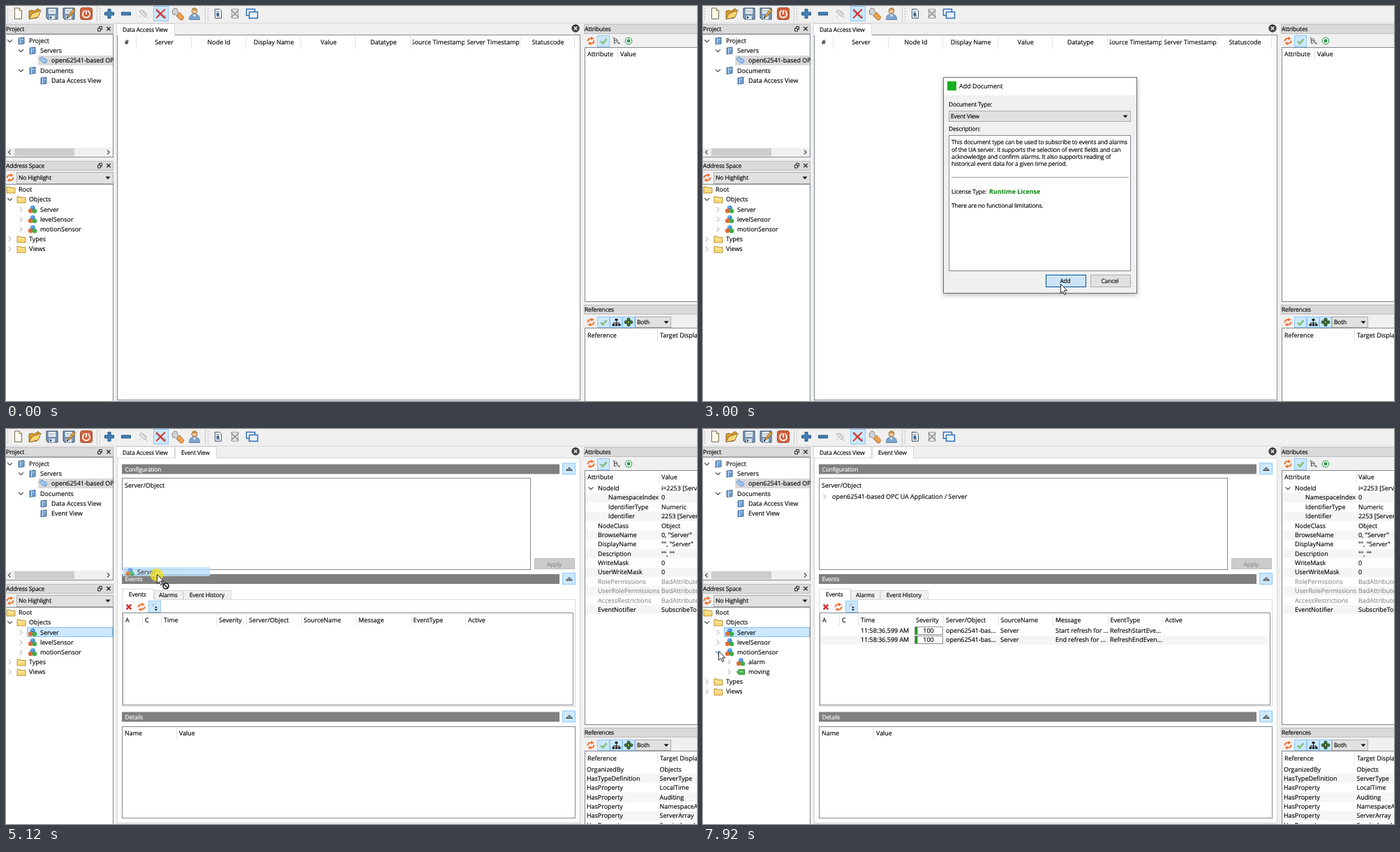
An HTML page for the animation above (8000 ms loop, 990 by 566 pixels).

```html
<!DOCTYPE html>
<html lang="en">
<head>
<meta charset="utf-8">
<title>Event view</title>
<style>
html, body { margin: 0; width: 100%; height: 100%; overflow: hidden; background: #f0f0f0; }
svg { display: block; }
text { font: 8.95px "Open Sans", "Noto Sans", sans-serif; color: #000; fill: currentColor; stroke: currentColor; stroke-width: .15px; white-space: pre; text-rendering: geometricPrecision; }
text.s { font-size: 8.5px; letter-spacing: -.19px; }
text.b { font-size: 8.85px; font-weight: 700; color: #008000; stroke: none; }
text.w { color: #fff; }
text.g { color: #8c8c8c; }
text.m { text-anchor: middle; }
</style>
</head>
<body>
<svg id="stage" width="990" height="566" viewBox="0 0 990 566"></svg>
<script>
const LOOP = 8000;
const BLUE = '#cce8ff', EDGE = '#90c8f6', LINE = '#828790', FACE = '#f0f0f0';

// Drawing helpers: y of a text is the middle of its line.
const text = (x, y, s, cls = '') => `<text x="${x}" y="${Math.round(y + 3.1)}" class="${cls}">${s}</text>`;
const small = (x, y, s, cls = '') => text(x, y, s, 's ' + cls);
const fill = (x, y, w, h, c) => `<rect x="${x}" y="${y}" width="${w}" height="${h}" fill="${c}"/>`;
const box = (x, y, w, h, c = '#fff', edge = LINE, lw = 1) =>
  `<rect x="${x + .5}" y="${y + .5}" width="${w - 1}" height="${h - 1}" fill="${c}" stroke="${edge}" stroke-width="${lw}"/>`;
const path = (d, f = 'none', s = 'none', w = 1) => `<path d="${d}" fill="${f}" stroke="${s}" stroke-width="${w}"/>`;
const circle = (x, y, r, f, s = 'none', w = 1) => `<circle cx="${x}" cy="${y}" r="${r}" fill="${f}" stroke="${s}" stroke-width="${w}"/>`;
const at = (x, y, s) => `<g transform="translate(${x} ${y})">${s}</g>`;
const group = (id, s) => `<g id="${id}">${s}</g>`;
const vline = (x, y, h, c = '#e3e3e3') => fill(x, y, 1, h, c);
const cross = (x, y, r, c, w) => path(`M${x - r} ${y - r}l${2 * r} ${2 * r}m0 ${-2 * r}l${-2 * r} ${2 * r}`, 'none', c, w);
const drop = (x, y) => path(`M${x - 3.5} ${y - 1.5}h7l-3.5 3.8z`, '#111');
const right = (x, y) => path(`M${x - 1.7} ${y - 3.4}l3.4 3.4l-3.4 3.4`, 'none', '#9a9a9a');
const down = (x, y, c = '#404040') => path(`M${x - 3.4} ${y - 1.7}l3.4 3.4l3.4 -3.4`, 'none', c, 1.2);

// Icons, each around its own middle
const icon = {
  folder: path('M-6 -4h4l1 1.5h7v7.500h-12z', '#f9d978', '#a8801f', .8) + fill(-5, -1, 10, 1, '#fff0b8'),
  book: path('M-4 -4l8 -1v9l-8 1z', '#6f9fd0', '#2d5583', .8) + path('M-1.500 -4v8.500M0 -2l3 -.3', 'none', '#c9e0f5'),
  plug: path('M-5.500 -3l3 -2.500l3 3l2 0l2.500 3l-2.500 3.500l-4 -1l-4 -4z', '#a9cdf4', '#4d83c4', .9) + path('M-3 -4l6 7', 'none', '#4d83c4', .7),
  cubes: circle(.3, -2.400, 3.400, '#3d8ee0') + circle(-2.800, 2, 3.300, '#e06a37') + circle(3, 2.300, 3.300, '#3fae49') + circle(-.6, -3.400, 1, '#a5d0fa'),
  tag: path('M-5.500 0l3 -3.500h8v7h-8z', '#49b649', '#1c7c24', .9) + fill(-1.500, -1, 5, 1, '#b9efb4'),
  refresh: path('M-4.500 .5a4 4 0 0 1 5 -4M4.500 -.5a4 4 0 0 1 -5 4', 'none', '#f26a21', 1.900) +
    path('M0 -6l4.500 2.200l-4 2.800zM0 6l-4.500 -2.200l4 -2.800z', '#f26a21'),
  check: path('M-4 .5l3 3l5.500 -6', 'none', '#5fa052', 2.400) + path('M-4 .5l3 3l5.500 -6', 'none', '#98d488', 1.200),
  page: path('M-4.500 -8h6.500l3.500 3.500v12h-10z', '#fffdee', '#655c3e', .9) + path('M2 -8v3.500h3.500', '#eadb91', '#655c3e', .7),
  open: path('M-8 7v-11l5 -1l2 1.500l6 -4l2 2v4l-4 8z', '#d99c2c', '#7a531a', .8) + path('M-8 8l4 -8l13 -5l-4 10z', '#f7d673', '#7a531a', .8),
  save: path('M-8 -8h16v16h-14l-2 -2z', '#7d9ab8', '#2f4a66') + fill(-5, -7, 10, 7, '#f3f6f9') + fill(-4, -5, 8, 1, '#a3b4c4') +
    fill(-4, -3, 8, 1, '#a3b4c4') + fill(-4, 3, 8, 5, '#dbe3ea') + fill(-3, 4, 2, 3, '#2f4a66'),
  pencil: path('M-2 4l8 -10l2.500 2l-8 9l-3 1z', '#f1a73b', '#6b4a1d', .8),
  power: `<rect x="-8.500" y="-8.500" width="17" height="17" rx="3" fill="#d4623f" stroke="#9c4a30"/>` +
    circle(0, .5, 5, 'none', '#fff', 1.800) + fill(-2, -6, 4, 6, '#d4623f') + fill(-.9, -5, 1.800, 6, '#fff'),
  plus: path('M-2 -6.500h4v4.500h4.500v4h-4.500v4.500h-4v-4.500h-4.500v-4h4.500z', '#4481b8', '#215583'),
  minus: path('M-6.500 -2h13v4h-13z', '#4481b8', '#215583'),
  link: path('M-6 -3l3 -2.500l7 7l-2.500 3z', '#e4e4e4', '#a9a9a9') + path('M-1 -5l6 6M3 4l3 2M-4 3l-2 2', 'none', '#b5b5b5'),
  cut: path('M-7 -4l3 -1l8 8l3 0v4l-3 -1z', '#b8c9dc', '#7890ab', .8) + cross(0, 0, 6.300, '#e3261c', 1.900),
  wrench: path('M-8 -4l3 -4l4 1l1 4l8 7l-1 4l-3 1l-8 -8l-3 0z', '#d1d4d7', '#72777c', .8) + path('M0 0l3 -2l6 7l-2 4l-3 0l-5 -6z', '#f0a04c', '#a8682a', .7),
  user: path('M-7.500 8.500c0 -6 3 -8 7.500 -8s7.500 2 7.500 8z', '#7fa6d3', '#4a6f98', .8) + path('M-2 1l2 4l2 -4z', '#fff') +
    circle(0, -4, 4, '#f3c79a', '#8a5c2d', .8) + path('M-4 -4a4 4.500 0 0 1 8 0q-4 -3 -8 0z', '#b98a45'),
  doc: path('M-4.500 -6.500h6.500l2.500 2.500v10.500h-9z', '#fff', '#43576b') + path('M-2.500 -2.500h4M-2.500 4h5', 'none', '#43576b') + fill(-2.500, -1, 4, 4, '#2f5f91'),
  noDoc: path('M-4.500 -6.500h9v13h-9z', '#e8e8e8', '#9a9a9a') + cross(0, 0, 5.500, '#8c8c8c', 1.500),
  windows: box(-8, -7, 13, 10, '#fff', '#2b6cb3', 1.500) + box(-4, -3, 13, 10, '#eaf4ff', '#2b6cb3', 1.500),
  tree: path('M-4 -5l1.500 1.500v6.500h3M-2.500 -1h2.500l4 5', 'none', '#4c4c4c', 1.100) + path('M-1 -4l4 4M3 3h2v2', 'none', '#4c4c4c'),
  target: circle(0, 0, 4.800, '#e9f7ec', '#2c9549', 1) + circle(0, 0, 2.400, '#2c9549'),
  chart: path('M0 -2v3M-4 3v-2h8v2M0 0v3', 'none', '#222') + fill(-2, -5, 4, 3, '#222') + fill(-6, 2.500, 3.500, 3, '#222') + fill(-1.700, 2.500, 3.500, 3, '#222') + fill(2.600, 2.500, 3.500, 3, '#222'),
  flower: [[0, -3.700], [3.700, 0], [0, 3.700], [-3.700, 0]].map(p => circle(...p, 2.100, '#3e8a3a', '#162c16')).join('') + circle(0, 0, 1.800, '#d9e25d', '#162c16'),
  scroll: path('M-3 -4h6M-3 -1.500h4', 'none', '#a9bccf') + path('M1 1.500l2 -2.500l2 2.500zM1 3l2 2.500l2 -2.500z', '#111')
};
const pic = (name, x, y) => at(x, y, icon[name]);
const active = (x, y, w, h) => box(x, y, w, h, BLUE, EDGE);

const node = (x, y, name, label, arrow) =>
  (arrow ? arrow(x - 16.500, y) : '') + pic(name, x, y) + text(x + 11, y, label);

const dockTitle = (x, y, w, label, tools) => box(x - 1, y, w + 1, 14, '#dadada', '#bcbcbc') + small(x, y + 7, label) +
  (tools ? path('M131.500 ' + (y + 6) + 'h4v4h-4zM133.500 ' + (y + 6) + 'v-2.500h4v4h-2', 'none', '#222') + cross(147, y + 6.700, 2.700, '#222', 1.300) : '');

const grip = x => [4, 8, 12, 16, 20].map(y => fill(x, y - 1, 1, 2, '#b5b5b5')).join('');

function toolbar() {
  const row = { page: 17, open: 41, save: 66, plus: 148, minus: 172, link: 197, cut: 221.500, wrench: 246, user: 270, doc: 304, noDoc: 328, windows: 352 };
  return fill(0, 0, 990, 25, FACE) + fill(0, 24, 990, 1, '#d8d8d8') + grip(2) + vline(130, 1, 22, '#c9c9c9') + grip(134) +
    vline(285, 1, 22, '#c9c9c9') + grip(289) + active(211, 0, 22, 22) + group('docHover', active(292, 0, 24, 22)) +
    Object.entries(row).map(([n, x]) => pic(n, x, 11)).join('') + pic('save', 90, 11) + pic('pencil', 91, 10) + pic('power', 115, 11);
}

function projectDock() {
  return dockTitle(0, 26, 154, 'Project', true) + box(-1, 40, 155, 177) +
    `<rect id="pick" x="46" y="71" width="107" height="14"/>` +
    down(5.500, 50) + node(22, 50, 'book', 'Project') + node(38, 64, 'book', 'Servers', down) +
    node(54, 78, 'plug', 'open62541-based OPC UA Application') +
    node(38, 92.500, 'book', 'Documents', down) + node(54, 107, 'book', 'Data Access View') +
    group('docRow', node(54, 121, 'book', 'Event View')) +
    fill(0, 203, 153, 13, FACE) + fill(12, 204, 86, 11, '#cdcdcd') +
    path('M6.500 206.500l-3 3l3 3M145 206.500l3 3l-3 3', 'none', '#505050', 1.300);
}

function addressDock() {
  return dockTitle(0, 222, 154, 'Address Space', true) + pic('refresh', 6, 246) +
    box(15, 238, 139, 17, '#e1e1e1', '#adadad') + small(18, 246, 'No Highlight') + drop(146, 246) +
    box(-1, 255, 155, 320) + pic('folder', 7, 263) + text(18, 263, 'Root') +
    node(22, 277, 'folder', 'Objects', down) +
    group('rowPick', box(30, 284, 123, 14, BLUE, '#7fbdea')) +
    node(38, 291.500, 'cubes', 'Server', right) + node(38, 305.700, 'cubes', 'levelSensor', right) +
    node(38, 320, 'cubes', 'motionSensor') + group('shut', right(21.500, 320)) +
    group('kids', down(21.500, 320, '#2c9fe0') + node(54, 334, 'cubes', 'alarm', right) + node(54, 348.300, 'tag', 'moving', right)) +
    group('tail', node(22, 334, 'folder', 'Types', right) + node(22, 348.300, 'folder', 'Views', right));
}

const attrs = [['NodeId', 'i=2253 [Server]'], ['NamespaceIndex', '0'], ['IdentifierType', 'Numeric'], ['Identifier', '2253 [Server]'],
  ['NodeClass', 'Object'], ['BrowseName', '0, "Server"'], ['DisplayName', '"", "Server"'], ['Description', '"", ""'],
  ['WriteMask', '0'], ['UserWriteMask', '0'], ['RolePermissions', 'BadAttributeIdInvalid'],
  ['UserRolePermissions', 'BadAttributeIdInvalid'], ['AccessRestrictions', 'BadAttributeIdInvalid'], ['EventNotifier', 'SubscribeToEvents']];
const refs = [['OrganizedBy', 'Objects'], ['HasTypeDefinition', 'ServerType'], ['HasProperty', 'LocalTime'], ['HasProperty', 'Auditing'],
  ['HasProperty', 'NamespaceArray'], ['HasProperty', 'ServerArray'], ['HasProperty', 'ServiceLevel']];
const PITCH = 13.37;

function rightDocks() {
  const stripe = (y, i) => i % 2 ? fill(830, y - 6.700, 160, PITCH, '#f5f5f5') : '';
  const attrRows = attrs.map(([k, v], i) => {
    const y = 85 + i * PITCH, c = i > 9 && i < 13 ? 'g' : '';
    return stripe(y, i) + text(i > 0 && i < 4 ? 863 : 848, y, k, c) + text(939, y, v, c);
  }).join('');
  const refRows = refs.map(([k, v], i) => {
    const y = 487.500 + i * PITCH;
    return stripe(y, i) + text(832, y, k) + text(936.500, y, v);
  }).join('');
  return dockTitle(829, 26, 170, 'Attributes') + pic('refresh', 838, 50) + active(847, 42, 18, 17) + pic('check', 856, 50) +
    pic('tree', 874, 50) + pic('target', 892, 50) + box(829, 59, 170, 365) + text(833, 69, 'Attribute') +
    group('attrNone', vline(876, 61, 16) + text(880, 69, 'Value')) +
    group('attrFull', vline(936, 61, 16) + text(939, 69, 'Value') + attrRows + down(838, 85)) +
    dockTitle(829, 428, 170, 'References') + pic('refresh', 838, 453) +
    [847, 865, 883].map(x => active(x, 445, 18, 16)).join('') + pic('check', 856, 453) + pic('chart', 874.500, 453) + pic('flower', 892, 453) +
    box(901, 445, 52, 16, '#e1e1e1', '#adadad') + small(904, 453, 'Both') + drop(946, 453) +
    box(829, 461, 170, 120) + text(833, 471.500, 'Reference') + vline(933, 463, 17) + text(937, 471.500, 'Target DisplayName') +
    group('refFull', refRows);
}

function dataView() {
  const heads = ['Server', 'Node Id', 'Display Name', 'Value', 'Datatype', 'Source Timestamp', 'Server Timestamp', 'Statuscode'];
  return box(159, 41, 664, 524) + text(173, 52, '#', 'm') + vline(186, 43, 18) + heads.map((h, i) => {
    const x = 187 + i * 78.570;
    return `<svg x="${x + 2.500}" y="42" width="74.500" height="20">${text(37, 10, h, 'm')}</svg>` + vline(Math.floor(x + 78), 43, 18);
  }).join('');
}

const tab = (x, y, w, h, label, c) => box(x, y, w, h + 1, c, '#d9d9d9') + small(x + w / 2 - .7, y + h / 2 + .4, label, 'm');

function section(y, label) {
  return fill(166, y, 627, 14, '#808080') + small(170.500, y + 7, label, 'w') + active(797, y - 2, 19, 17) +
    path(`M802.500 ${y + 9}l4.500 -4.500l4.500 4.500z`, '#8a949c', '#333', .9);
}

function eventView() {
  const cols = [[171, 'A', 195], [199, 'C', 222], [226, 'Time', 301], [305, 'Severity', 344], [348, 'Server/Object', 423],
    [426.500, 'SourceName', 501], [505, 'Message', 580], [583.500, 'EventType', 658], [662, 'Active', 0]];
  const row = (y, a, b) => text(226, y, '11:58:36.599 AM') + box(303, y - 6, 41, 12, '#fff', '#8f8f8f') + fill(304, y - 5, 3.500, 10, '#1d9a1d') +
    text(323, y, '100', 'm') + text(348, y, 'open62541-bas...') + text(426, y, 'Server') + text(505, y, a) + text(583, y, b);
  return box(159, 41, 664, 524, '#fff', '#d4d4d4') + section(50.500, 'Configuration') + box(166, 70, 586, 132) + text(170, 81, 'Server/Object') +
    group('confRow', right(174, 97) + text(185, 97, 'open62541-based OPC UA Application / Server')) +
    box(757, 185, 58, 16, '#cccccc', '#bfbfbf') + small(785.500, 193.500, 'Apply', 'm g') +
    section(208, 'Events') + box(166, 244, 650, 154, '#fff', '#d9d9d9') +
    tab(212, 231, 42, 13, 'Alarms', FACE) + tab(254, 231, 69, 13, 'Event History', FACE) + tab(166, 229, 46, 15, 'Events', '#fff') + fill(167, 244, 44, 2, '#fff') +
    cross(176, 255, 3.300, '#d3302f', 2.600) + pic('refresh', 194, 255) + active(204, 246, 18, 17) + pic('scroll', 212, 255) +
    box(167, 263, 646, 133) + cols.map(([x, s, v]) => text(x, 273.500, s) + (v ? vline(v, 265, 17) : '')).join('') +
    group('events', fill(168, 296, 644, 13, '#f5f5f5') + row(289, 'Start refresh for ...', 'RefreshStartEve...') + row(302, 'End refresh for ...', 'RefreshEndEven...')) +
    section(405.500, 'Details') + box(166, 426, 650, 132) + text(170, 436, 'Name') + vline(244, 428, 17) + text(248, 436, 'Value');
}

function dialog() {
  const lines = ['This document type can be used to subscribe to events and alarms', 'of the UA server. It supports the selection of event fields and can',
    'acknowledge and confirm alarms. It also supports reading of', 'historical event data for a given time period.'];
  const button = (id, x, s) => `<rect id="${id}" x="${x + .5}" y="385.500" width="57" height="17" fill="#e1e1e1" stroke="#adadad"/>` + small(x + 28, 394, s, 'm');
  return `<g style="filter:drop-shadow(0 2px 3px rgba(0,0,0,.3))">${box(344, 102, 278, 310, FACE, '#6e6e6e')}</g>` + fill(345, 103, 276, 25, '#fff') +
    fill(350, 108, 13, 13, '#18b020') + text(367, 114.500, 'Add Document') +
    group('dlgTools', text(568, 114.500, '?', 'm') + cross(603, 114.500, 4, '#333', 1)) +
    small(352, 141, 'Document Type:') + `<rect id="combo" x="352.500" y="150.500" width="260" height="15"/>` + small(355, 158, 'Event View') + drop(605, 158) +
    small(352, 176, 'Description:') + box(352, 185, 261, 195) + lines.map((s, i) => small(356, 195.300 + i * 10.250, s)).join('') +
    fill(356, 245, 254, 1, '#a0a0a0') + small(356, 266, 'License Type:') + text(410, 266, 'Runtime License', 'b') +
    small(356, 286, 'There are no functional limitations.') + button('add', 491, 'Add') + button('cancel', 555, 'Cancel');
}

const ghost = `<g opacity=".8">${fill(-49, -10, 125, 13, '#b9defa')}${pic('cubes', -38.500, -3)}${text(-28, -3, 'Server')}</g>`;
const forbid = circle(13, 17, 4, '#fff', '#111', 1.600) + path('M10 14l6 6', 'none', '#111', 1.500);
const arrow = path('M.5 .5v13l3 -2.900l2.300 5l2.200 -1l-2.300 -4.800h4.200z', '#fff', '#111', .9);

document.getElementById('stage').innerHTML = fill(0, 0, 990, 566, FACE) + projectDock() + addressDock() + fill(154, 25, 5, 541, FACE) +
  group('dataPane', dataView()) + group('eventPane', eventView()) +
  tab(158, 25, 84, 16, 'Data Access View', '#fff') + group('eventTab', tab(242, 25, 60, 16, 'Event View', '#fff') + fill(243, 41, 58, 1, '#fff')) +
  group('dataTab', fill(159, 41, 82, 1, '#fff')) + circle(816, 32, 5.700, '#3f3f3f') + cross(816, 32, 2.200, '#fff', 1.400) +
  rightDocks() + toolbar() + group('dialog', dialog()) +
  group('tip', fill(281, 181, 250, 15, 'rgba(0,0,0,.3)') + box(278, 178, 251, 16, '#fff', '#767676') + `<g opacity=".75">${text(283, 186, 'Drop event notifiers here from the Address Space window.')}</g>`) +
  group('mouse', group('ghost', ghost) + group('press', circle(0, 1, 9.300, 'rgba(240,222,40,.8)')) + arrow + group('forbid', forbid));

const el = {};
document.querySelectorAll('[id]').forEach(n => el[n.id] = n);
const show = (id, on) => el[id].setAttribute('display', on ? 'inline' : 'none');
const set = (id, o) => Object.entries(o).forEach(([k, v]) => el[id].setAttribute(k, v));
const ramp = (t, a, b) => Math.min(1, Math.max(0, (t - a) / (b - a)));

// Pointer stops: time, x, y
const stops = [[160, 870, 503], [920, 309, 13], [1000, 309, 12], [1480, 309, 12], [1960, 440, 142], [2160, 436, 160], [2800, 512, 398], [3020, 512, 398],
  [3560, 238, 322], [3700, 238, 322], [4240, 56, 291], [4440, 56, 291], [4640, 77, 294], [4920, 77, 294], [5120, 216, 208], [5400, 276, 162],
  [6720, 276, 162], [7080, 15, 332], [7520, 90, 245], [7840, 22, 318], [8000, 22, 318]];

function pointer(t) {
  const i = Math.max(1, stops.findIndex(s => s[0] >= t));
  const [a, x, y] = stops[i - 1], [b, u, v] = stops[i];
  const k = ramp(t, a, b), e = k * k * (3 - 2 * k);
  return [x + (u - x) * e, y + (v - y) * e];
}

function draw(t) {
  const [x, y] = pointer(t);
  show('mouse', t >= 160);
  set('mouse', { transform: `translate(${Math.round(x)} ${Math.round(y)})` });
  const drag = t >= 4960 && t < 5400;
  show('ghost', drag);
  show('forbid', drag && y > 202);
  show('press', t >= 4600 && t < 5400);
  show('docHover', t < 1300 && t >= 160 && x < 316 && y < 22);

  const focus = t >= 1160 && t < 1300 || t >= 3160 && t < 4200;
  set('pick', { fill: focus ? BLUE : '#d9d9d9' });

  // Dialog grows in and shrinks out
  const open = ramp(t, 1280, 1460), close = ramp(t, 3080, 3240);
  const vis = open * (1 - close);
  const size = 1 - .036 * (1 - vis);
  show('dialog', vis > 0);
  set('dialog', { opacity: Math.min(1, vis * 1.250), transform: `translate(482.5 257) scale(${size}) translate(-482.5 -257)` });
  show('dlgTools', t < 1500);
  const inCombo = t > 1500 && t < 2800 && y > 150 && y < 166 && x > 352;
  set('combo', { fill: inCombo ? '#e5f1fb' : '#e1e1e1', stroke: inCombo ? '#0078d7' : '#adadad' });
  const inAdd = t > 2400 && y > 385 && x > 491;
  const pressed = t >= 2960;
  set('add', { fill: pressed ? '#cce4f7' : inAdd ? '#e5f1fb' : '#e1e1e1', stroke: pressed ? '#005499' : '#0078d7', 'stroke-width': inAdd ? 1 : 1.700 });

  const event = t >= 3200;
  ['eventPane', 'eventTab', 'docRow'].forEach(id => show(id, event));
  ['dataPane', 'dataTab'].forEach(id => show(id, !event));

  const picked = t >= 4200;
  ['rowPick', 'attrFull', 'refFull'].forEach(id => show(id, picked));
  show('attrNone', !picked);
  show('confRow', t >= 5600);
  show('events', t >= 6040);
  const tip = ramp(t, 6340, 6560) * (1 - ramp(t, 6760, 6900));
  show('tip', tip > 0);
  set('tip', { opacity: tip });

  const wide = t >= 7840;
  show('kids', wide);
  show('shut', !wide);
  set('tail', { transform: `translate(0 ${wide ? 28 : 0})` });
}

const start = performance.now();
function tick() {
  draw((performance.now() - start) % LOOP);
  requestAnimationFrame(tick);
}
tick();
</script>
</body>
</html>
```
